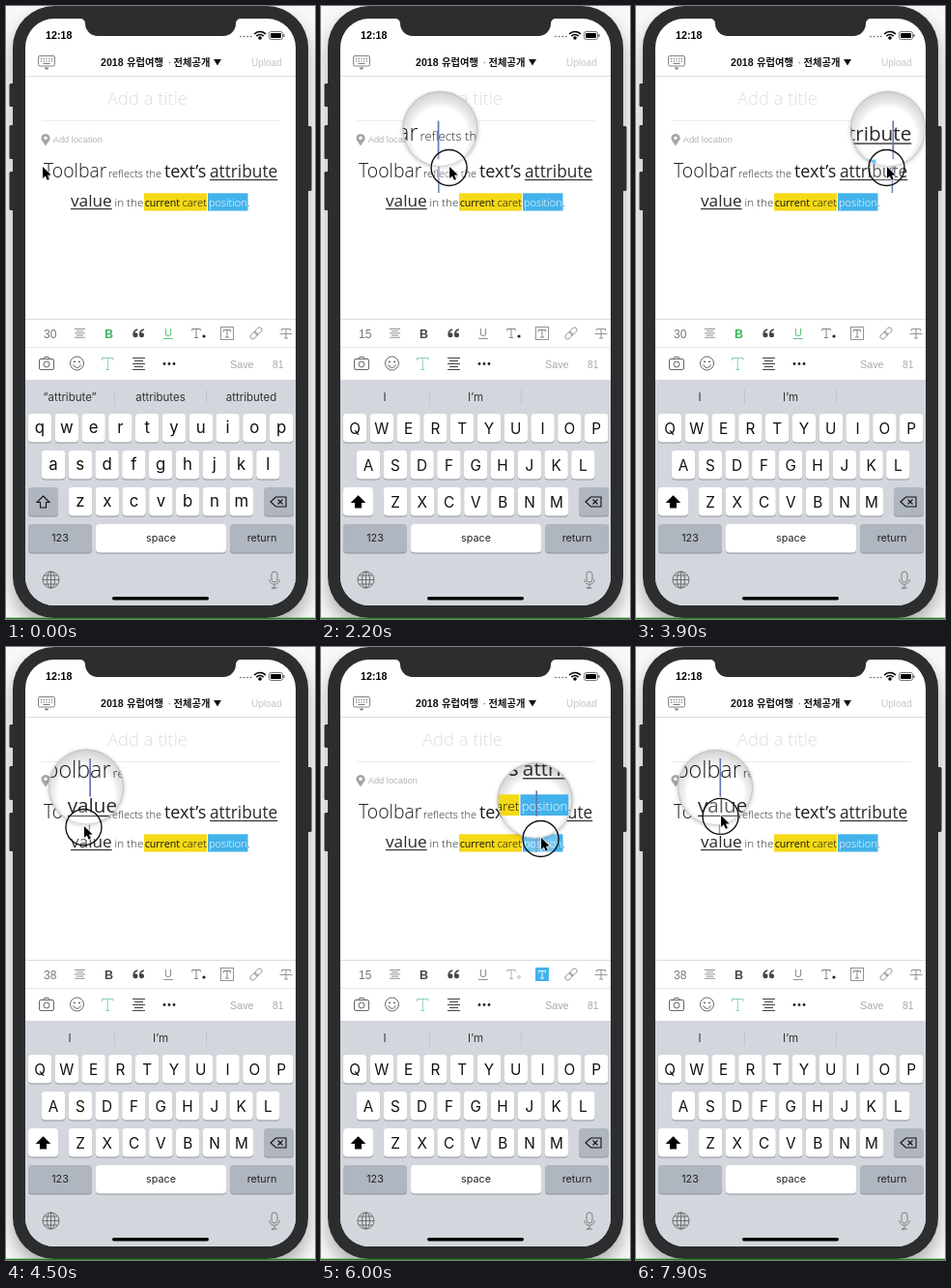
Animation, 320 px wide and 633 px high, one loop 8 s. Source, as an HTML page with a canvas:

```html
<!DOCTYPE html>
<html lang="ko">
<head>
<meta charset="utf-8">
<title>Editor toolbar</title>
<style>
html, body { margin: 0; width: 100%; height: 100%; overflow: hidden; background: #f8f8f8; }
canvas { display: block; width: 320px; height: 633px; }
</style>
</head>
<body>
<canvas id="stage"></canvas>
<script>
const W = 320, H = 633, LOOP = 8000;
const canvas = document.getElementById('stage');
const ctx = canvas.getContext('2d');
const dpr = window.devicePixelRatio || 1;
canvas.width = W * dpr;
canvas.height = H * dpr;

const UI = '"Liberation Sans", Arial, sans-serif';
const KEY = 'Inter, Roboto, sans-serif';
const BODY = '"Open Sans", "Noto Sans", sans-serif';
const GREEN = '#35b558', YELLOW = '#f5d916', BLUE = '#43b2ea', CASE = '#2b2d2f';
const SCREEN = { x: 20, y: 13, w: 280, h: 606, r: 30 };

// ---------- drawing helpers ----------
function text(s, x, y, font, color, align = 'left') {
  ctx.font = font;
  ctx.fillStyle = color;
  ctx.textAlign = align;
  ctx.fillText(s, x, y);
}
function box(x, y, w, h, color) {
  ctx.fillStyle = color;
  ctx.fillRect(x, y, w, h);
}
function roundPath(x, y, w, h, r) {
  ctx.beginPath();
  ctx.roundRect(x, y, w, h, r);
}
function round(x, y, w, h, r, color) {
  roundPath(x, y, w, h, r);
  ctx.fillStyle = color;
  ctx.fill();
}
function pen(color, width) {
  ctx.strokeStyle = color;
  ctx.lineWidth = width;
}
function poly(points, closed) {
  ctx.beginPath();
  points.forEach(([x, y]) => ctx.lineTo(x, y));
  if (closed) ctx.closePath();
}
function line(...points) {
  poly(points);
  ctx.stroke();
}
function arc(x, y, r, from = 0, to = Math.PI * 2) {
  ctx.beginPath();
  ctx.arc(x, y, r, from, to);
}
function dot(x, y, r, color) {
  arc(x, y, r);
  ctx.fillStyle = color;
  ctx.fill();
}
function ring(x, y, r) {
  arc(x, y, r);
  ctx.stroke();
}
function bars(cx, y, widths, gap) {
  widths.forEach((w, i) => line([cx - w / 2, y + i * gap], [cx + w / 2, y + i * gap]));
}
function letterT(cx, top, w, h, serif) {
  line([cx - w / 2, top + serif], [cx - w / 2, top], [cx + w / 2, top], [cx + w / 2, top + serif]);
  line([cx, top], [cx, top + h]);
  line([cx - 2, top + h], [cx + 2, top + h]);
}

// ---------- rich text ----------
const LINES = [
  { y: 177, caret: [160, 193], runs: [
    { s: 'Toolbar', x: 39, px: 19.4, w: 300, color: '#1c1c1c', size: 38 },
    { s: 'reflects the', x: 106, px: 11, w: 300, color: '#2a2a2a', size: 15 },
    { s: 'text’s', x: 164, px: 18, w: 400, color: '#1c1c1c', size: 30, b: true },
    { s: 'attribute', x: 211, px: 17.3, w: 400, color: '#2a2a2a', size: 30, b: true, u: true }
  ] },
  { y: 207, caret: [190, 212], runs: [
    { s: 'value', x: 67, px: 17.2, w: 400, color: '#2a2a2a', size: 30, b: true, u: true },
    { s: 'in the', x: 112.5, px: 11.7, w: 300, color: '#2a2a2a', size: 15 },
    { s: 'current', x: 143.7, px: 10.6, w: 400, color: '#111', size: 15, b: true, bg: YELLOW },
    { s: 'caret', x: 182.5, px: 11.3, w: 300, color: '#111', size: 15, bg: YELLOW },
    { s: 'position', x: 210, px: 11, w: 300, color: '#fff', size: 15, bg: BLUE, pale: true },
    { s: '.', x: 250, px: 11.3, w: 300, color: '#444', size: 15 }
  ] }
];
const runFont = r => `${r.w} ${r.px}px ${BODY}`;
function runWidth(r, n = r.s.length) {
  ctx.font = runFont(r);
  return ctx.measureText(r.s.slice(0, n)).width;
}

function drawBody() {
  box(143, 193.3, 65, 18.2, YELLOW);
  box(209, 193.3, 41.5, 18.2, BLUE);
  for (const { y, runs } of LINES) {
    for (const r of runs) {
      text(r.s, r.x, y, runFont(r), r.color);
      if (r.u) box(r.x, y + 2, runWidth(r), 1.1, r.color);
    }
  }
}

function findCaret(x, y) {
  const row = LINES[y < 187 ? 0 : 1];
  let best = { d: Infinity };
  row.runs.forEach((run, k) => {
    for (let i = k ? 1 : 0; i <= run.s.length; i++) {
      const cx = run.x + runWidth(run, i);
      const d = Math.abs(cx - x);
      if (d < best.d) best = { d, x: cx, run, row };
    }
  });
  return best;
}
function drawCaret(c) {
  const [top, bottom] = c.row.caret;
  box(c.x - 0.7, top, 1.4, bottom - top, '#6674b4');
}

// ---------- pointer ----------
const PATH = [
  [0, 38, 167], [1250, 38, 167], [1700, 76, 167], [2200, 133, 167], [2950, 238, 167],
  [3200, 249, 168], [3650, 263, 167], [3980, 259, 167], [4380, 84, 184], [4500, 81, 186],
  [4780, 70, 203], [4950, 76, 204], [5600, 198, 200], [6000, 228, 198], [6400, 245, 199],
  [6700, 222, 202], [6950, 152, 204], [7100, 140, 205], [7580, 82, 202], [7800, 81, 187],
  [8000, 95, 163]
];
const PRESS = 400, HOLD = 900, LAG = 85, LENS_UP = 40, LENS_R = 39, ZOOM = 1.2;

function pointerAt(t) {
  const i = Math.max(1, PATH.findIndex(p => p[0] >= t));
  const [t0, x0, y0] = PATH[i - 1], [t1, x1, y1] = PATH[i];
  const k = Math.max(0, (t - t0) / (t1 - t0));
  return { x: x0 + (x1 - x0) * k, y: y0 + (y1 - y0) * k };
}

function drawLens(at, caret, grow) {
  ctx.save();
  ctx.translate(at.x, at.y - LENS_UP * grow);
  ctx.scale(grow, grow);
  ctx.save();
  ctx.shadowColor = 'rgba(0,0,0,.25)';
  ctx.shadowBlur = 4;
  ctx.shadowOffsetY = 1;
  dot(0, 0, LENS_R, '#fff');
  ctx.restore();

  // glass tint lies under the text, which stays crisp up to the rim
  ctx.save();
  arc(0, 0, LENS_R);
  ctx.clip();
  const glass = ctx.createRadialGradient(0, 7, 29, 0, 5, 46);
  glass.addColorStop(0, 'rgba(222,222,222,0)');
  glass.addColorStop(0.3, 'rgba(222,222,222,.6)');
  glass.addColorStop(1, 'rgba(190,190,190,.85)');
  box(-40, -40, 80, 80, glass);
  ctx.scale(ZOOM, ZOOM);
  ctx.translate(-at.x, -at.y);
  drawBody();
  drawCaret(caret);
  ctx.restore();
  pen('#c4c4c4', 1);
  ring(0, 0, LENS_R - 0.5);
  ctx.restore();
}

function drawPointer({ x, y }, pressed) {
  if (pressed) {
    dot(x - 0.5, y, 18.5, 'rgba(255,255,255,.25)');
    pen('#111', 1.4);
    ring(x - 0.5, y, 18.5);
  }
  const arrow = [[0, 0], [0, 12], [2.8, 9.4], [4.8, 13.8], [6.8, 13], [4.9, 8.7], [8.6, 8.5]];
  poly(arrow.map(([dx, dy]) => [x + dx, y - 1 + dy]), true);
  pen('#fff', 1.2);
  ctx.stroke();
  ctx.fillStyle = '#000';
  ctx.fill();
}

// ---------- phone and header ----------
function drawPhone() {
  box(0, 0, W, H, '#f8f8f8');
  ctx.save();
  ctx.shadowColor = 'rgba(0,0,0,.3)';
  ctx.shadowBlur = 18;
  ctx.shadowOffsetY = 10;
  round(7, 0, 306, 632, 43, CASE);
  ctx.restore();
  [[80, 24], [123, 35], [171, 40]].forEach(([y, h]) => round(3.5, y, 5, h, 1.5, CASE));
  round(311.5, 124, 5, 67, 1.5, CASE);
  box(0, 631.7, W, 1.3, '#1c801c');
}

function drawStatus() {
  const { y } = SCREEN, bottom = 31;
  ctx.beginPath();
  ctx.moveTo(77, y);
  ctx.arcTo(82, y, 82, y + 5, 5);
  ctx.arcTo(82, bottom, 96, bottom, 13);
  ctx.arcTo(238, bottom, 238, y + 5, 13);
  ctx.arcTo(238, y, 243, y, 5);
  ctx.lineTo(243, y);
  ctx.fillStyle = CASE;
  ctx.fill();

  text('12:18', 41, 34, `bold 10.7px ${UI}`, '#000');
  for (let i = 0; i < 4; i++) dot(243 + i * 3.6, 31.5, 0.8, '#555');
  pen('#000', 1.7);
  [8, 5].forEach(r => {
    arc(263, 34.5, r, -Math.PI * 0.76, -Math.PI * 0.24);
    ctx.stroke();
  });
  dot(263, 33, 1.8, '#000');
  pen('#555', 0.8);
  roundPath(272.5, 26.5, 14, 8, 2);
  ctx.stroke();
  round(274, 28, 11, 5, 1, '#000');
  box(287.3, 29, 1.2, 3, '#555');
}

function drawHeader() {
  pen('#777', 0.9);
  roundPath(33.5, 51.5, 17, 10.5, 1.5);
  ctx.stroke();
  for (let i = 0; i < 5; i++) {
    box(36 + i * 2.7, 54, 1.2, 1.2, '#777');
    box(36 + i * 2.7, 56.5, 1.2, 1.2, '#777');
  }
  box(38.5, 59, 7, 1, '#777');
  poly([[39.5, 63.5], [44.5, 63.5], [42, 66]], true);
  ctx.fillStyle = '#777';
  ctx.fill();

  const hangul = 'bold 10.3px "Noto Sans CJK KR", "Noto Sans CJK", sans-serif';
  text('2018', 98, 62, `bold 10.6px ${UI}`, '#111');
  text('유럽여행', 125, 62, hangul, '#111');
  text('·', 167.5, 62, `10.5px ${UI}`, '#555');
  text('전체공개', 173.5, 62, hangul, '#111');
  poly([[215, 55], [223, 55], [219, 61.5]], true);
  ctx.fillStyle = '#111';
  ctx.fill();
  text('Upload', 254, 61.5, `10px ${UI}`, '#c6c6c6');
  box(20, 72, 280, 1, '#dedede');

  text('Add a title', 105, 102, `300 18.4px ${BODY}`, '#dedede');
  box(37, 118, 247, 1, '#ececec');
  arc(41, 136.5, 4.6, Math.PI * 0.85, Math.PI * 2.15);
  ctx.lineTo(41, 144.5);
  ctx.fillStyle = '#a5a5a5';
  ctx.fill();
  dot(41, 136.3, 1.7, '#fff');
  text('Add location', 48.7, 141, `9.3px ${UI}`, '#b4b4b4');
}

// ---------- toolbars ----------
function drawFormatBar(style) {
  box(20, 323, 280, 1, '#dcdcdc');
  text(String(style.size), 39, 342.5, `12px ${UI}`, '#777');
  pen('#888', 0.9);
  bars(76.5, 333.5, [11, 7, 11, 7, 11], 2.2);
  text('B', 106.5, 342.5, `bold 12.5px ${UI}`, style.b ? GREEN : '#444', 'center');

  for (const x of [134, 140.5]) {
    dot(x, 339.8, 2.5, '#444');
    pen('#444', 1.4);
    ctx.beginPath();
    ctx.moveTo(x - 2, 339.5);
    ctx.quadraticCurveTo(x - 2, 335, x + 2.3, 334);
    ctx.stroke();
  }

  const under = style.u ? '#55bf73' : '#888';
  text('U', 168, 341, `11px ${UI}`, under, 'center');
  box(163, 343, 10, 0.9, under);

  pen(style.pale ? '#aaa' : '#777', 0.9);
  letterT(197, 333.5, 8.5, 9, 2);
  if (style.pale) {
    pen('#aaa', 0.8);
    ring(205, 341, 1.4);
  } else dot(205, 341, 1.6, '#222');

  if (style.bg) box(222, 331, 14, 14, style.bg);
  else {
    pen('#888', 0.9);
    ctx.strokeRect(222.5, 331.5, 13, 13);
  }
  pen(style.bg ? '#fff' : '#777', 0.9);
  letterT(229, 334.5, 7, 7.5, 2);

  ctx.save();
  ctx.translate(259, 338);
  ctx.rotate(-Math.PI / 4);
  pen('#888', 0.9);
  for (const x of [-7.5, -1]) {
    roundPath(x, -2.5, 8.5, 5, 2.5);
    ctx.stroke();
  }
  ctx.restore();

  pen('#888', 0.9);
  letterT(290, 333.5, 9, 9.5, 2);
  line([283.5, 338.5], [296.5, 338.5]);
  box(20, 352, 280, 1, '#e6e6e6');
}

function drawInsertBar() {
  pen('#555', 0.9);
  roundPath(34.5, 364.5, 15, 11, 1.5);
  ctx.stroke();
  line([38.5, 364.5], [39.8, 362.5], [44.2, 362.5], [45.5, 364.5]);
  ring(42, 370, 3);
  ring(73.5, 369, 7);
  dot(71, 367.3, 0.9, '#444');
  dot(76, 367.3, 0.9, '#444');
  arc(73.5, 369.5, 3.8, 0.2, Math.PI - 0.2);
  ctx.stroke();

  const tint = ctx.createLinearGradient(99, 0, 111, 0);
  tint.addColorStop(0, '#78c993');
  tint.addColorStop(1, '#86c8d0');
  pen(tint, 0.9);
  letterT(105.3, 363.5, 11.5, 12, 2.5);

  pen('#444', 1);
  bars(137.5, 363.5, [13, 9, 13, 9, 13], 3);
  [164, 169, 174].forEach(x => dot(x, 369.5, 1.4, '#222'));
  text('Save', 232, 373.5, `10.8px ${UI}`, '#aaa');
  text('81', 276, 373.5, `10.3px ${UI}`, '#aaa');
}

// ---------- keyboard ----------
function key(x, y, w, color) {
  round(x, y + 1, w, 29.5, 4, '#8d9198');
  round(x, y, w, 29.5, 4, color);
}
function drawKeyboard(upper) {
  box(20, 386, 280, 240, '#d3d6dc');
  const words = upper ? ['I', 'I’m', ''] : ['“attribute”', 'attributes', 'attributed'];
  words.forEach((s, i) => text(s, 66 + i * 94, 407.5, `11.5px ${KEY}`, '#333', 'center'));
  box(112, 396, 1, 16, '#c2c6cc');
  box(207, 396, 1, 16, '#c2c6cc');

  const rows = [['qwertyuiop', 35], ['asdfghjkl', 49], ['zxcvbnm', 77]];
  const font = `${upper ? 15.3 : 16.8}px ${KEY}`;
  rows.forEach(([letters, start], r) => {
    const y = 421 + r * 38;
    const baseline = y + (upper ? 20.5 : 19.5);
    [...letters].forEach((ch, i) => {
      const cx = start + i * 27.8;
      key(cx - 12.2, y, 24.4, '#fff');
      text(upper ? ch.toUpperCase() : ch, cx, baseline, font, '#111', 'center');
    });
  });

  const grey = '#b0b6c0';
  key(23, 497, 31, upper ? '#fff' : grey);
  poly([[38.5, 506], [45, 512.5], [41.5, 512.5], [41.5, 518], [35.5, 518], [35.5, 512.5], [32, 512.5]], true);
  pen('#111', 1.1);
  ctx.stroke();
  if (upper) {
    ctx.fillStyle = '#000';
    ctx.fill();
  }

  key(267, 497, 31, grey);
  poly([[274, 512], [279.5, 507], [290, 507], [290, 517], [279.5, 517]], true);
  ctx.stroke();
  line([281.5, 509.5], [286.5, 514.5]);
  line([286.5, 509.5], [281.5, 514.5]);

  key(23, 535, 66, grey);
  key(93, 535, 135, '#fff');
  key(232, 535, 66, grey);
  [['123', 56], ['space', 160.5], ['return', 265]].forEach(([s, x]) =>
    text(s, x, 553, `10.8px ${KEY}`, '#222', 'center'));

  pen('#666', 0.9);
  ring(46.5, 592.5, 8.5);
  ctx.beginPath();
  ctx.ellipse(46.5, 592.5, 4, 8.5, 0, 0, Math.PI * 2);
  ctx.stroke();
  line([46.5, 584], [46.5, 601]);
  line([38, 592.5], [55, 592.5]);
  line([39.5, 588], [53.5, 588]);
  line([39.5, 597], [53.5, 597]);

  pen('#777', 0.9);
  roundPath(275, 584, 6, 11, 3);
  ctx.stroke();
  arc(278, 592, 5.3, 0, Math.PI);
  ctx.stroke();
  line([278, 597.5], [278, 601], [275, 601], [281, 601]);
  round(110, 610, 100, 3.6, 1.8, '#000');
}

// ---------- frame ----------
const START_STYLE = { size: 30, b: true, u: true };

function render(t) {
  ctx.setTransform(dpr, 0, 0, dpr, 0, 0);
  const held = t >= HOLD;
  const lens = pointerAt(Math.max(0, t - LAG));
  const caret = held ? findCaret(lens.x, lens.y) : null;

  drawPhone();
  ctx.save();
  const { x, y, w, h, r } = SCREEN;
  roundPath(x, y, w, h, r);
  ctx.clip();
  box(x, y, w, h, '#fff');
  drawStatus();
  drawHeader();
  drawBody();
  drawFormatBar(held ? caret.run : START_STYLE);
  drawInsertBar();
  drawKeyboard(held);
  if (held) {
    drawCaret(caret);
    drawLens(lens, caret, Math.min(1, 0.2 + (t - HOLD) / 200));
  }
  ctx.restore();
  drawPointer(pointerAt(t), t >= PRESS);
}

const began = performance.now();
function tick() {
  render((performance.now() - began) % LOOP);
  requestAnimationFrame(tick);
}
tick();
</script>
</body>
</html>
```
